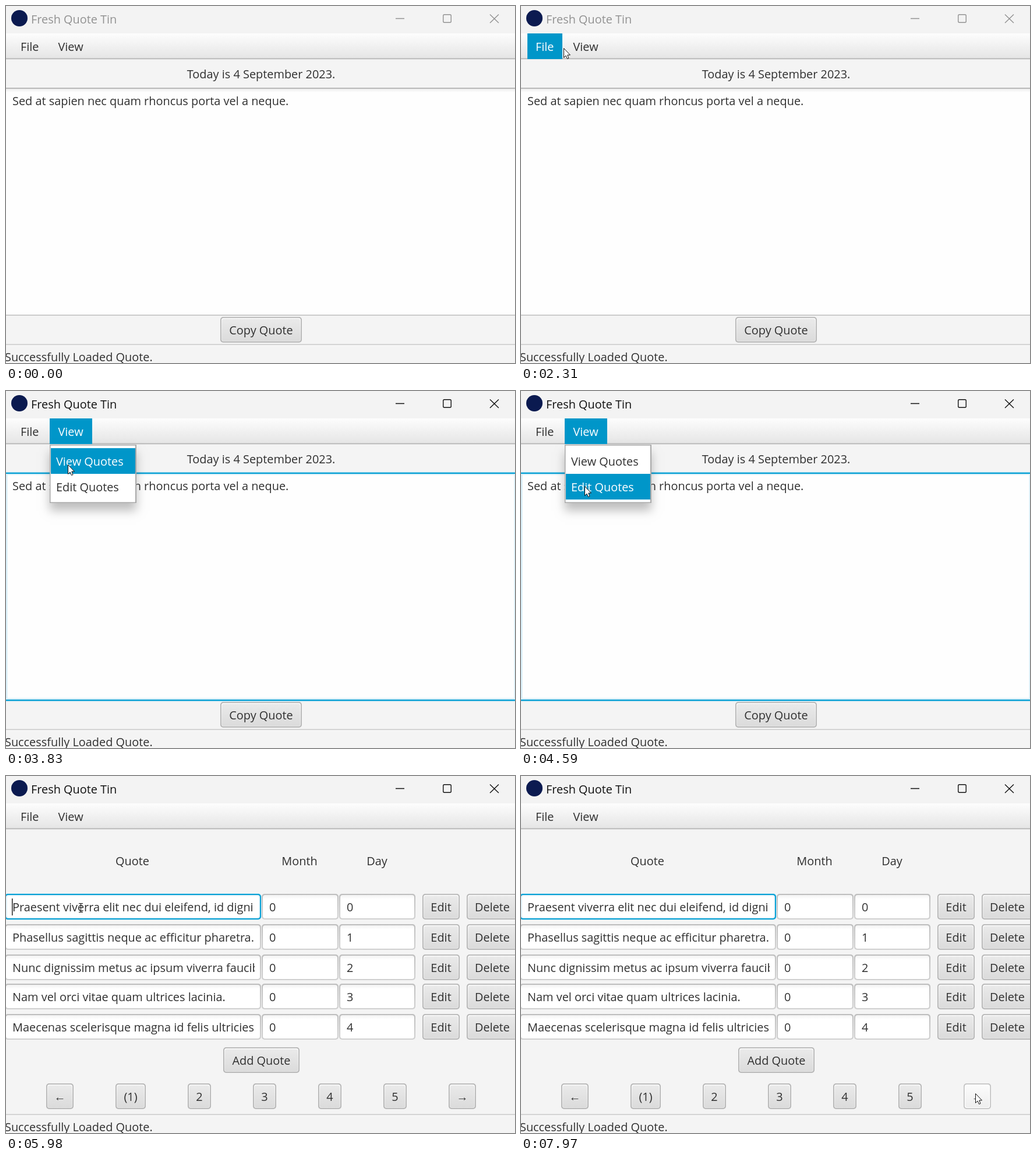
An HTML page with a canvas for the animation above (7990 ms loop, 874 by 612 pixels).

```html
<!DOCTYPE html>
<html lang="en">
<head>
<meta charset="utf-8">
<title>Fresh Quote Tin</title>
<style>
html, body { margin: 0; width: 100%; height: 100%; overflow: hidden; background: #f4f4f4; }
canvas { display: block; }
</style>
</head>
<body>
<canvas id="stage" width="874" height="612"></canvas>
<script>
const W = 874, H = 612, LOOP = 7990;
const ACTIVE = 2700, CLOSE = 5360, GONE = 5460, PAGE = 5510;
const INK = '#303030', BLUE = '#0096c9', FOCUS = '#039ed3', BG = '#f4f4f4';
const c = document.getElementById('stage').getContext('2d');

// Pointer path: time, x, y
const path = [
  [430, 807, 606], [700, 455, 405], [1000, 180, 243], [1210, 107, 201], [1250, 97, 191],
  [1280, 97, 191], [1480, 80, 145], [1720, 84, 80], [2020, 59, 74], [2050, 59, 73],
  [2210, 59, 73], [2310, 73, 72], [2550, 110, 66], [3010, 110, 66], [3710, 106, 124],
  [3810, 106, 124], [3830, 106, 126], [4200, 106, 126], [4610, 109, 163], [5770, 109, 163],
  [5980, 128, 226], [6080, 128, 226], [6560, 296, 465], [6960, 560, 490], [7360, 718, 521],
  [7940, 780, 544], [LOOP, 780, 544]
];

const quotes = [
  'Praesent viverra elit nec dui eleifend, id digni',
  'Phasellus sagittis neque ac efficitur pharetra.',
  'Nunc dignissim metus ac ipsum viverra faucibus',
  'Nam vel orci vitae quam ultrices lacinia.',
  'Maecenas scelerisque magna id felis ultricies'
];
const rowTops = [202, 254, 306, 356, 408];
const pageKeys = [['←', 69, 47], ['(1)', 188, 52], ['2', 312, 40], ['3', 424, 40],
  ['4', 536, 40], ['5', 648, 40], ['→', 760, 47]];

function slope(i, k) {
  const a = path[i - 1], b = path[i], d = path[i + 1];
  const still = (p, q) => p[1] === q[1] && p[2] === q[2];
  if (!a || !d || still(a, b) || still(b, d)) return 0;
  return (d[k] - a[k]) / (d[0] - a[0]);
}

// Smooth cubic through the path points, resting where the pointer rests
function pointerAt(t) {
  if (t < path[0][0]) return { x: -99, y: -99 };
  let i = 0;
  while (i < path.length - 2 && t >= path[i + 1][0]) i++;
  const a = path[i], b = path[i + 1], dt = b[0] - a[0], u = (t - a[0]) / dt;
  const at = k => {
    const rise = u * u * (3 - 2 * u);
    return a[k] + (b[k] - a[k]) * rise
      + dt * u * (1 - u) * ((1 - u) * slope(i, k) - u * slope(i + 1, k));
  };
  return { x: at(1), y: at(2) };
}

const inside = (p, x, y, w, h) => p.x >= x && p.x < x + w && p.y >= y && p.y < y + h;

function rect(x, y, w, h, fill, r = 0) {
  c.fillStyle = fill;
  c.beginPath();
  c.roundRect(x, y, w, h, r);
  c.fill();
}

function fade(y, h, top, bottom) {
  const g = c.createLinearGradient(0, y, 0, y + h);
  g.addColorStop(0, top);
  g.addColorStop(1, bottom);
  return g;
}

function text(s, x, y, color = INK, align = 'left') {
  c.fillStyle = color;
  c.textAlign = align;
  c.fillText(s, x, y);
}

function button(s, x, y, w, p) {
  const hot = inside(p, x, y, w, 44);
  rect(x, y, w, 44, hot ? '#c3c3c3' : '#b5b5b5', 5);
  rect(x + 1.75, y + 1.75, w - 3.5, 40.5, hot ? '#ffffff' : fade(y, 44, '#fbfbfb', '#e2e2e2'), 4);
  rect(x + 3, y + 3.5, w - 6, 37.5, hot ? fade(y, 44, '#fcfcfc', '#ededed') : fade(y, 44, '#ebebeb', '#dadada'), 3);
  text(s, x + w / 2, y + 30, INK, 'center');
}

function field(s, x, y, w, focused) {
  if (focused) rect(x - 1, y - 1, w + 2, 46, '#d5edf7', 6);
  rect(x, y, w, 44, focused ? FOCUS : fade(y, 44, '#bdbdbd', '#d0d0d0'), 5);
  rect(x + 2, y + 2, w - 4, 40, focused ? '#e3f3fa' : fade(y, 9, '#efefef', '#ffffff'), 4);
  if (focused) rect(x + 4, y + 4, w - 8, 36, '#ffffff', 2);
  c.save();
  c.beginPath();
  c.rect(0, y, x + w - 11, 44);
  c.clip();
  text(s, Math.max(x + 13, 11), y + 30);
  c.restore();
}

function titleBar(active) {
  const ink = active ? '#111' : '#929292';
  rect(0, 0, W, 47, '#f3f3f3');
  rect(9, 7, 28, 28, '#0b1a50', 14);
  text('Fresh Quote Tin', 43, 30, ink);
  c.strokeStyle = ink;
  c.lineWidth = 1.4;
  c.beginPath();
  c.moveTo(669, 21.5); c.lineTo(684, 21.5);
  c.roundRect(750.75, 14.75, 13.5, 13.5, 2);
  c.moveTo(831, 14.5); c.lineTo(846, 29);
  c.moveTo(846, 14.5); c.lineTo(831, 29);
  c.stroke();
}

function menuBar(p, open) {
  rect(0, 47, W, 43, fade(47, 43, '#fdfdfd', '#e5e5e5'));
  rect(0, 89.5, W, 1.75, '#b5b5b5');
  const view = open || inside(p, 75, 47, 73, 44);
  const file = !open && inside(p, 11, 47, 64, 44);
  if (file) rect(11, 47, 60, 44, BLUE);
  if (view) rect(75, 47, 73, 44, BLUE);
  text('File', 25, 77, file ? '#fff' : INK);
  text('View', 89.5, 77, view ? '#fff' : INK);
}

function homePage(p, focused) {
  text('Today is 4 September 2023.', 438, 124, INK, 'center');
  if (focused) {
    rect(0, 138.5, W, 394, '#cfe9f4');
    rect(0, 139.7, W, 391.6, FOCUS);
    rect(0, 142, W, 387, '#d9eff8');
    rect(2.5, 144, W - 4, 382.5, '#fefefe');
  } else {
    rect(0, 140, W, 391, fade(140, 391, '#b9b9b9', '#cbcbcb'));
    rect(0, 142, W, 387, fade(142, 6, '#ededed', '#fefefe'));
  }
  text('Sed at sapien nec quam rhoncus porta vel a neque.', 11, 170);
  button('Copy Quote', 368, 533, 140, p);
}

function popup(p, alpha) {
  c.save();
  c.globalAlpha = alpha;
  c.shadowColor = 'rgba(0,0,0,.25)';
  c.shadowBlur = 16;
  c.shadowOffsetY = 13;
  rect(75, 92, 149, 100, '#a9a9a9');
  c.shadowColor = 'transparent';
  rect(76.5, 93.5, 145.5, 97, '#fff');
  ['View Quotes', 'Edit Quotes'].forEach((s, i) => {
    const y = 98 + 44 * i, hot = inside(p, 76, y, 147, 44);
    if (hot) rect(77, y, 145, 44, BLUE);
    text(s, 86, y + 30, hot ? '#fff' : INK);
  });
  c.restore();
}

function quotesPage(p, t) {
  text('Quote', 217, 153, INK, 'center');
  text('Month', 504, 153, INK, 'center');
  text('Day', 637, 153, INK, 'center');
  rowTops.forEach((y, i) => {
    field(quotes[i], -2, y, 440, i === 0);
    field('0', 439, y, 132);
    field(String(i), 572, y, 131);
    button('Edit', 715, y, 64, p);
    button('Delete', 791, y, 88, p);
  });
  if (t >= 5970 && (t - 5970) % 1004 < 502 && t < 7900) rect(10, 210, 1.5, 29, '#222');
  button('Add Quote', 373, 465, 131, p);
  pageKeys.forEach(([s, x, w]) => button(s, x, 527, w, p));
}

function pointer(p, beam) {
  c.save();
  c.translate(Math.round(p.x), Math.round(p.y));
  c.beginPath();
  if (beam) {
    c.moveTo(-3, -7.5); c.lineTo(4, -7.5);
    c.moveTo(.5, -7.5); c.lineTo(.5, 7.5);
    c.moveTo(-3, 7.5); c.lineTo(4, 7.5);
  } else {
    c.moveTo(.5, .5);
    [[.5, 16.5], [4, 13], [6.5, 18.5], [9, 17.5], [6.8, 12], [11.5, 12]].forEach(q => c.lineTo(...q));
    c.closePath();
    c.fillStyle = '#fff';
    c.fill();
  }
  c.strokeStyle = '#111';
  c.lineWidth = 1;
  c.stroke();
  c.restore();
}

function draw(t) {
  const p = pointerAt(t), open = t >= ACTIVE && t < PAGE, home = t < PAGE;
  c.font = '19.9px "Open Sans", "Noto Sans", sans-serif';
  rect(0, 0, W, H, BG);
  titleBar(t >= ACTIVE);
  menuBar(p, open);
  if (home) homePage(p, t >= ACTIVE);
  else quotesPage(p, t);
  rect(0, 579.5, W, 2, '#cdcdcd');
  rect(0, 581.5, W, 1.5, '#fafafa');
  text('Successfully Loaded Quote.', -2, 609);
  if (open && t < GONE) popup(p, t < CLOSE ? Math.min(1, (t - ACTIVE + 20) / 110) : .5);
  const beam = home ? !open && inside(p, 0, 142, W, 387)
    : rowTops.some(y => inside(p, 0, y, 703, 44));
  pointer(p, beam);
}

function tick() {
  draw(performance.now() % LOOP);
  requestAnimationFrame(tick);
}
tick();
</script>
</body>
</html>
```
